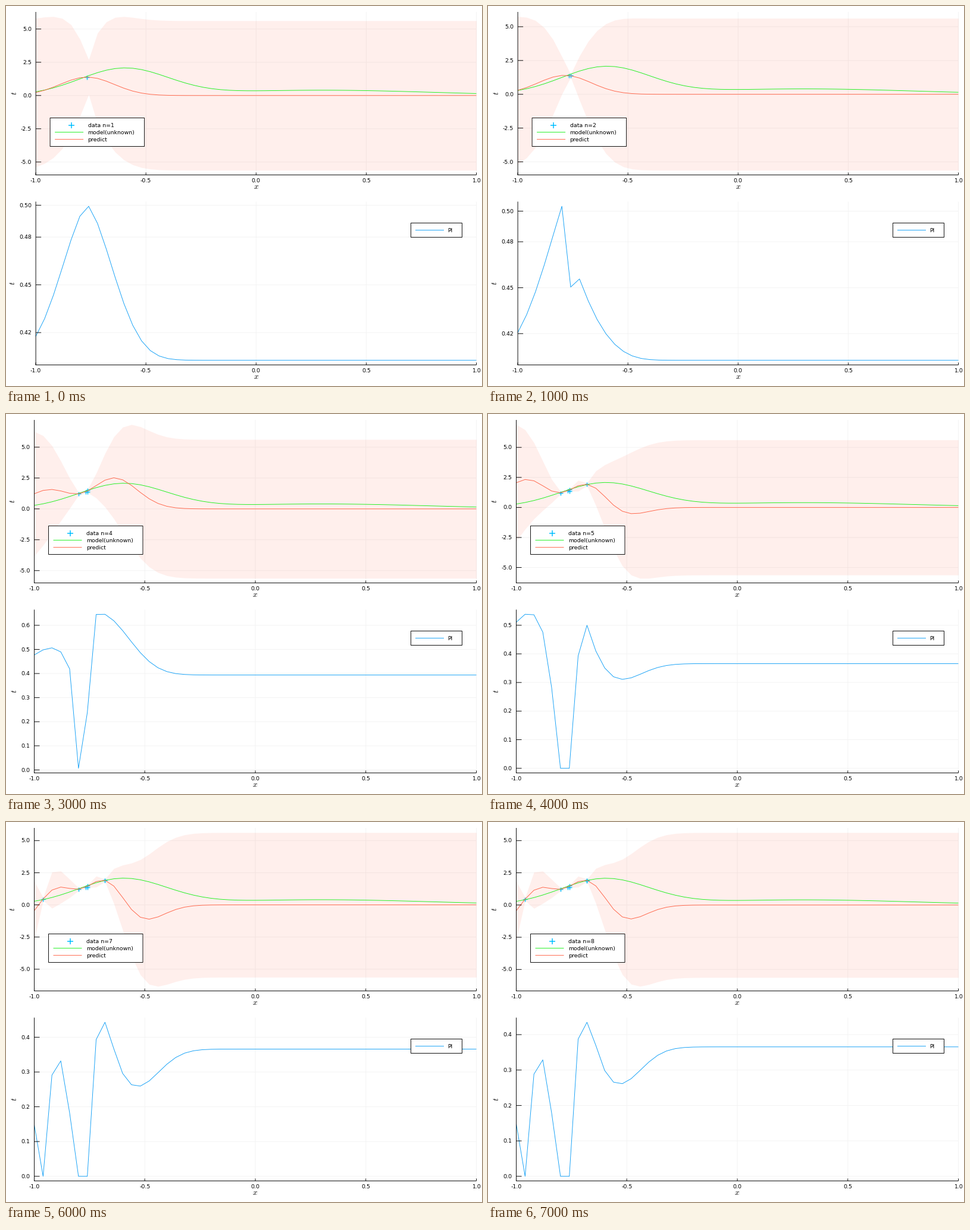
Write a matplotlib script that moves like this. It is 800 px wide and 640 px high and loops after 8000 ms.

```python
import math

import matplotlib.pyplot as plt
import numpy as np
from matplotlib.animation import FuncAnimation
from matplotlib.patches import Rectangle

W, H, DPI = 800, 640, 100
PX = 72 / DPI  # points per pixel
plt.rcParams["mathtext.fontset"] = "cm"
plt.rcParams["font.family"] = "DejaVu Sans"
plt.rcParams["path.snap"] = False

# Gaussian process settings
AMP, SCALE, NOISE = 1000.0, 0.03, 2.1e-4
GRID = np.linspace(-1, 1, 51)
SAMPLES = np.array([
    (-0.7667, 1.387), (-0.76, 1.372), (-0.80, 1.219), (-0.76, 1.5163),
    (-0.68, 1.927), (-0.96, 0.462), (-0.68, 1.898), (-0.68, 1.935),
])
MODEL = (2 * np.exp(-(GRID + 0.6) ** 2 / 0.08)
         + 0.4 * np.exp(-(GRID - 0.3) ** 2 / 0.5))

RIGHT = 790.5
TOP_PANEL = (10, 284.5)
LOW_PANEL = (329.5, 604.5)
SKY, LIME, TOMATO, BLUE = "deepskyblue", "#1cf01c", "tomato", "#119ff6"

fig = plt.figure(figsize=(W / DPI, H / DPI), dpi=DPI, facecolor="white")
ax = fig.add_axes([0, 0, 1, 1])


def kernel(a, b):
    return AMP * np.exp(-(a[:, None] - b[None, :]) ** 2 / SCALE)


def posterior(xs, ts):
    cov = kernel(xs, xs) + NOISE * np.eye(len(xs))
    cross = kernel(xs, GRID)
    weights = np.linalg.solve(cov, cross)
    var = AMP - np.sum(cross * weights, axis=0)
    return weights.T @ ts, np.maximum(var, 1e-9) ** 0.25


def improvement(mean, spread, best):
    z = (mean - best) / spread
    return np.array([0.5 * (1 + math.erf(v / math.sqrt(2))) for v in z])


def line(xs, ys, color="black", width=0.92, z=3):
    ax.plot(xs, ys, color=color, lw=width * PX, zorder=z,
            solid_capstyle="butt", solid_joinstyle="round")


def text(x, y, label, align="left", z=6):
    ax.text(x, y + 3.1, label, size=9.35 * PX, ha=align, va="baseline", zorder=z)


def cross(xs, ys, size, width, z):
    ax.plot(xs, ys, "+", color=SKY, ms=size * PX, mew=width * PX, zorder=z)


def frame_box(x, y, w, h):
    ax.add_patch(Rectangle((x, y), w, h, fc="white", ec="black",
                           lw=0.92 * PX, zorder=5))


def scale_y(panel, low, high):
    """Map values to pixels with a 3 % margin at both ends."""
    top, bottom = panel
    pad = 0.03 * (high - low)
    unit = (bottom - top) / (high - low + 2 * pad)
    return lambda v: bottom - (v - low + pad) * unit


def draw_axes(panel, left, to_x, to_y, ticks, fmt, name_x):
    top, bottom = panel
    for v in (-1, -0.5, 0, 0.5, 1):
        x = to_x(v)
        line([x, x], [top, bottom], "#f3f3f3", z=0)
        line([x, x], [bottom - 4, bottom], z=4)
        text(x, bottom + 9.5, f"{v:.1f}", "center")
    for v in ticks:
        y = to_y(v)
        line([left, RIGHT], [y, y], "#f3f3f3", z=0)
        line([left, left + 9], [y, y], z=4)
        text(left - 7, y, format(v, fmt), "right")
    line([left, left], [top, bottom + 0.5], z=4)
    line([left - 0.5, RIGHT], [bottom, bottom], z=4)
    ax.text(to_x(0), bottom + 23.5, "$x$", size=13.5 * PX,
            ha="center", va="baseline")
    ax.text(name_x, (top + bottom) / 2, "$t$", size=13.5 * PX, rotation=90,
            ha="center", va="center")


def draw_top_legend(left, count):
    x = left + 24
    frame_box(x, 188.5, 158.5, 48)
    cross([x + 36], [200.5], 10, 1.5, 6)
    line([x + 8, x + 56], [212.5, 212.5], LIME, z=6)
    line([x + 8, x + 56], [224.5, 224.5], TOMATO, z=6)
    labels = (f"data n={count}", "model(unknown)", "predict")
    for row, label in enumerate(labels):
        text(x + 63.5, 200.6 + 12.1 * row, label)


def draw_low_legend():
    frame_box(680.5, 365.5, 86, 24)
    line([688, 736], [377.5, 377.5], BLUE, z=6)
    text(742.5, 377.7, "PI")


def draw(i):
    ax.clear()
    ax.set(xlim=(0, W), ylim=(H, 0))
    ax.axis("off")

    count = i + 1
    xs, ts = SAMPLES[:count].T
    mean, spread = posterior(xs, ts)
    upper, lower = mean + spread, mean - spread
    pi = improvement(mean, spread, ts.max())

    fine = count < 3  # narrow range, two decimals on the lower axis
    left = 50.1 if fine else 47.5

    def to_x(v):
        return left + (v + 1) / 2 * (RIGHT - left)

    gx = to_x(GRID)

    to_y = scale_y(TOP_PANEL, min(lower.min(), ts.min()),
                   max(upper.max(), MODEL.max()))
    draw_axes(TOP_PANEL, left, to_x, to_y, (-5, -2.5, 0, 2.5, 5), ".1f",
              13.5 if fine else 11)
    ax.fill_between(gx, to_y(lower), to_y(upper), color=TOMATO,
                    alpha=0.1, lw=0, zorder=1)
    cross(to_x(xs), to_y(ts), 7, 1.4, 2)
    line(gx, to_y(MODEL), LIME)
    line(gx, to_y(mean), TOMATO)
    draw_top_legend(left, count)

    to_y = scale_y(LOW_PANEL, pi.min(), pi.max())
    if fine:
        ticks = (0.42, 0.45, 0.48, 0.5)
    else:
        ticks = [k / 10 for k in range(10)
                 if LOW_PANEL[0] < to_y(k / 10) < LOW_PANEL[1]]
    draw_axes(LOW_PANEL, left, to_x, to_y, ticks, ".2f" if fine else ".1f",
              11 if fine else 14)
    line(gx, to_y(pi), BLUE)
    draw_low_legend()
    return []


anim = FuncAnimation(fig, draw, frames=len(SAMPLES), interval=1000,
                     init_func=lambda: [], repeat=True, repeat_delay=0)
plt.show()
```
